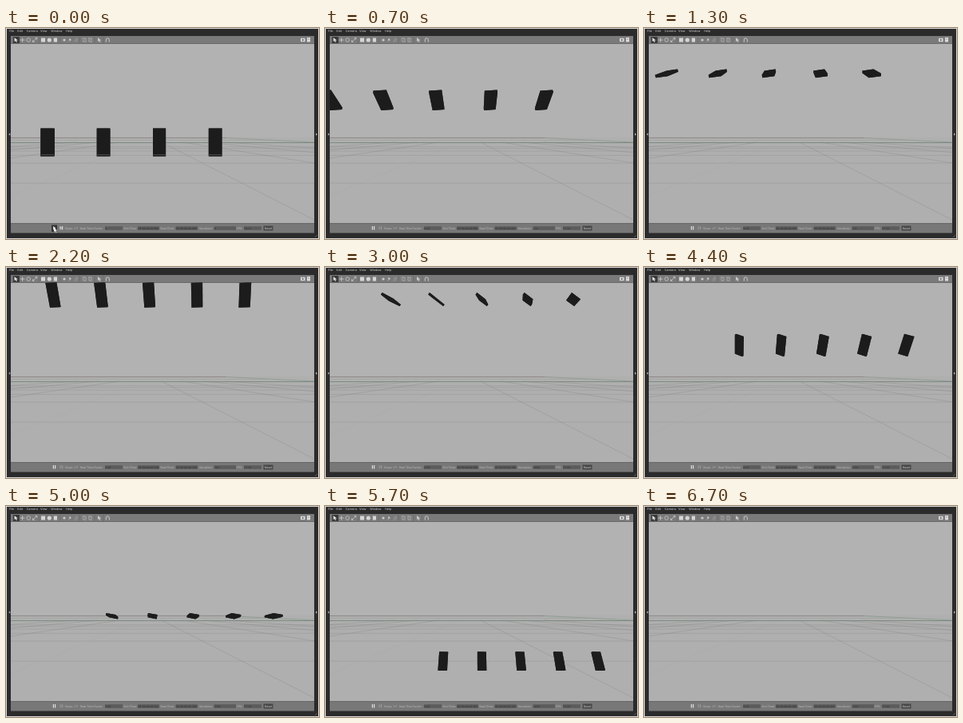
These frames come from a looping animation (392 px wide and 264 px high, 6800 ms). An HTML page with a canvas:

```html
<!DOCTYPE html>
<html lang="en">
<head>
<meta charset="utf-8">
<title>Tumbling boxes</title>
<style>
html, body { margin: 0; width: 100%; height: 100%; overflow: hidden; background: #2b2b2b; }
canvas { display: block; width: 392px; height: 264px; }
</style>
</head>
<body>
<canvas id="stage" width="392" height="264"></canvas>
<script>
const ctx = document.getElementById('stage').getContext('2d');
ctx.textRendering = 'geometricPrecision';
const LOOP = 6800, STEP = 100;
const VIEW = { x: 6, y: 19.5, w: 380, h: 225 };
const FOCAL = 329, CX = 196, HORIZON = 137;
const SIZE = [0.495, 0.228, 0.05]; // length, width, thickness

function rect(x, y, w, h, color) {
  ctx.fillStyle = color;
  ctx.fillRect(x, y, w, h);
}

function frame(x, y, w, h, color, width) {
  ctx.strokeStyle = color;
  ctx.lineWidth = width;
  ctx.strokeRect(x, y, w, h);
}

function line(color, width, ...pts) {
  ctx.strokeStyle = color;
  ctx.lineWidth = width;
  ctx.beginPath();
  for (let i = 0; i < pts.length; i += 2) ctx.lineTo(pts[i], pts[i + 1]);
  ctx.stroke();
}

function poly(color, ...pts) {
  ctx.fillStyle = color;
  ctx.beginPath();
  for (let i = 0; i < pts.length; i += 2) ctx.lineTo(pts[i], pts[i + 1]);
  ctx.fill();
}

function disc(x, y, r, color, hollow) {
  ctx.beginPath();
  ctx.arc(x, y, r, 0, Math.PI * 2);
  ctx.fillStyle = ctx.strokeStyle = color;
  ctx.lineWidth = 0.8;
  hollow ? ctx.stroke() : ctx.fill();
}

function text(str, x, y, color, size) {
  ctx.font = size + 'px "DejaVu Sans", sans-serif';
  ctx.fillStyle = color;
  ctx.fillText(str, x, y);
}

function pointer(x, y, color) {
  poly(color, x, y, x + 4.4, y + 3.5, x + 2.5, y + 3.6, x + 3.4, y + 5.6, x + 2.3, y + 6, x + 1.5, y + 4, x, y + 5);
}

function drawGround() {
  for (let i = 0; i < 6; i++) {
    const y = HORIZON + 1 / (0.0175 + i * 0.0137);
    line('rgba(110,110,110,.34)', 0.6, 6, y, 386, y);
  }
  for (let i = -4; i < 4; i++) {
    const slope = 1.97 + i * 4.4;
    const alpha = i === -1 ? 0.07 : 0.36;
    line(`rgba(105,105,105,${alpha})`, 0.6, 183 + slope * 6, HORIZON + 6, 183 + slope * 120, HORIZON + 120);
  }
  line('#857b7b', 0.8, 6, 137.4, 275, 137.4);
  line('#849588', 0.7, 275, 137.4, 386, 143);
  line('#9ba19d', 0.6, 6, 140.3, 330, 140.3);
  line('#78877c', 0.9, 6, 143.5, 386, 143.5);
}

// Spin about a nearly horizontal axis, with one half twist on the way.
function pose(t) {
  const k = 1.8 * (t - 3.58);
  const twist = t > 0 ? 2 * Math.atan(Math.exp(k) + 0.05) : 0;
  const spin = (94.5 * t - 10 * (1 + Math.tanh(k)) * (t > 0)) * Math.PI / 180;
  const sa = 0.234 * Math.sin(twist), ca = Math.sqrt(1 - sa * sa);
  const c = Math.cos(spin), s = Math.sin(spin);
  const cw = Math.cos(twist), sw = Math.sin(twist);
  const side = [ca, sa * c, sa * s], normal = [0, -s, c];
  return [
    [-sa, ca * c, ca * s],
    side.map((v, i) => cw * v + sw * normal[i]),
    side.map((v, i) => -sw * v + cw * normal[i])
  ];
}

function drawBox(center, axes) {
  const corners = [];
  for (let n = 0; n < 8; n++) {
    const p = center.map((v, i) => axes.reduce(
      (sum, axis, a) => sum + axis[i] * SIZE[a] * ((n >> a & 1) - 0.5), v));
    corners.push([CX + FOCAL * p[0] / p[2], HORIZON + FOCAL * p[1] / p[2]]);
  }
  for (const face of ['0132', '4576', '0154', '2376', '0264', '1375'])
    poly('#1c1c1c', ...[...face].flatMap(n => corners[n]));
}

function drawBoxes(t) {
  const gap = 1 / (0.01429 + 0.00113 * t);
  const z = FOCAL / gap;
  const y = 0.0857 - 1.477 * t + 0.2985 * t * t;
  const axes = pose(t);
  for (let i = 0; i < 5; i++) {
    const x = -18 + 70 * i + (7.72 - i) * (70 - gap);
    drawBox([(x - CX) / gap, y, z], axes);
    if (t === 0) line('#606060', 0.7, x - 8, 158.6, x + 8, 158.6);
  }
}

function drawToolbar() {
  rect(6, 10, 380, 9.5, '#7a7a7a');
  const ink = '#cacaca', dim = '#a0a0a0';
  rect(8.8, 11, 8, 8, '#383838');
  pointer(10.5, 12, '#e4e4e4');
  line(ink, 0.9, 17.8, 15, 23.4, 15);
  line(ink, 0.9, 20.6, 12.2, 20.6, 17.8);
  disc(28.2, 15, 2.3, ink, true);
  line(ink, 0.8, 33.5, 17.4, 38.8, 12.4);
  line(ink, 0.8, 33.5, 15.3, 33.5, 17.4, 35.6, 17.4);
  line(ink, 0.8, 36.6, 12.4, 38.8, 12.4, 38.8, 14.6);
  rect(44, 12.5, 5, 5, '#d6d6d6');
  disc(54.3, 15, 2.6, '#d6d6d6');
  rect(59.8, 12.5, 4.2, 5, '#d6d6d6');
  disc(73, 15, 1.6, ink);
  disc(80, 14.3, 1.1, ink);
  line(ink, 0.7, 78.5, 16.8, 82, 14.6);
  for (let i = 0; i < 3; i++) line(dim, 0.6, 85.5 + i * 1.8, 17.5, 87.5 + i * 1.2, 12.7);
  for (const x of [96, 103.3]) {
    frame(x, 12.4, 3.3, 4, dim, 0.7);
    frame(x + 1.2, 13.6, 3.3, 4, dim, 0.7);
  }
  pointer(115, 12, ink);
  ctx.strokeStyle = ink;
  ctx.lineWidth = 1;
  ctx.beginPath();
  ctx.arc(127.3, 14.8, 2, Math.PI, 0);
  ctx.lineTo(129.3, 17.5);
  ctx.moveTo(125.3, 14.8);
  ctx.lineTo(125.3, 17.5);
  ctx.stroke();
  for (const x of [41.5, 67.5, 92, 111, 121.8]) line('#686868', 0.6, x, 11, x, 19);
  rect(369, 12.8, 5.5, 4.3, '#dddddd');
  disc(371.7, 15, 1.2, '#777');
  rect(377, 12, 4, 5.4, '#dddddd');
  line('#777', 0.6, 377.8, 14, 380.2, 14);
}

const pad = (n, len) => String(n).padStart(len, '0');

function drawStatus(t) {
  rect(6, 244.5, 380, 12, '#787878');
  line('#5c5c5c', 0.6, 6, 244.6, 386, 244.6);
  const tick = Math.floor((t + 0.1) / 0.75);
  const shown = t > 0 ? Math.max(0.1, tick * 0.75 - 0.1) : 0;
  const ms = Math.round(shown * 55);
  const clock = n => '00 00:00:00.' + pad(n, 3);
  const ink = '#c2c2c2';
  if (t > 0) {
    rect(58.8, 248, 1.2, 4.5, '#e0e0e0');
    rect(61, 248, 1.2, 4.5, '#e0e0e0');
  } else {
    rect(57, 246.5, 7, 8.5, '#333333');
    poly('#e0e0e0', 59, 248, 62.5, 250.3, 59, 252.5);
    pointer(60, 250, '#f0f0f0');
  }
  const step = t > 0 ? '#969696' : '#e0e0e0';
  rect(67.5, 248.2, 1.2, 4, step);
  rect(69.7, 248.2, 1.5, 4, step);
  text('Steps: 1', 74, 251.7, ink, 3.3);
  poly(ink, 88, 250.6, 89, 249.3, 90, 250.6);
  const fields = [
    ['Real Time Factor:', 93, 124, 22, t > 0 ? '0.05' : '0'],
    ['Sim Time:', 147.5, 165, 27, clock(ms)],
    ['Real Time:', 193.5, 212.5, 27.5, clock(Math.round(ms * 1.18))],
    ['Iterations:', 242, 260.5, 27.5, String(Math.round(shown * 355))],
    ['FPS:', 289, 298, 22, t > 0 ? '57.02' : '58.51']
  ];
  for (const [label, x, fx, w, value] of fields) {
    text(label, x, 251.7, ink, 3.3);
    rect(fx, 248.2, w, 4.6, '#5c5c5c');
    text(value, fx + 0.6, 251.6, '#2c2c2c', 3.1);
  }
  rect(322.5, 247.5, 12, 6, '#484848');
  text('Reset', 323.8, 251.7, '#d0d0d0', 3.4);
}

function drawWindow() {
  rect(0, 0, 392, 264, '#2b2b2b');
  frame(0.5, 0.5, 391, 263, '#d8d8d8', 1);
  const menu = [['File', 4], ['Edit', 14.3], ['Camera', 25.8], ['View', 43], ['Window', 56.3], ['Help', 75]];
  for (const [name, x] of menu) text(name, x, 5.4, '#cecece', 3.6);
  poly('#bdbdbd', 5.2, 131.3, 3.4, 133, 5.2, 134.7);
  poly('#bdbdbd', 388, 131.3, 389.8, 133, 388, 134.7);
  line('#777', 0.6, 387, 262, 390, 259);
}

function draw(now) {
  const t = Math.floor(now % LOOP / STEP) * STEP / 1000;
  drawWindow();
  drawToolbar();
  ctx.save();
  ctx.beginPath();
  ctx.rect(VIEW.x, VIEW.y, VIEW.w, VIEW.h);
  ctx.clip();
  rect(VIEW.x, VIEW.y, VIEW.w, VIEW.h, '#b2b2b2');
  rect(6, HORIZON, 380, 108, '#afafaf');
  drawGround();
  if (t < 6.35) drawBoxes(Math.max(0, t - 0.1));
  ctx.restore();
  drawStatus(t);
}

const start = performance.now();
function tick() {
  draw(performance.now() - start);
  requestAnimationFrame(tick);
}
tick();
</script>
</body>
</html>
```
